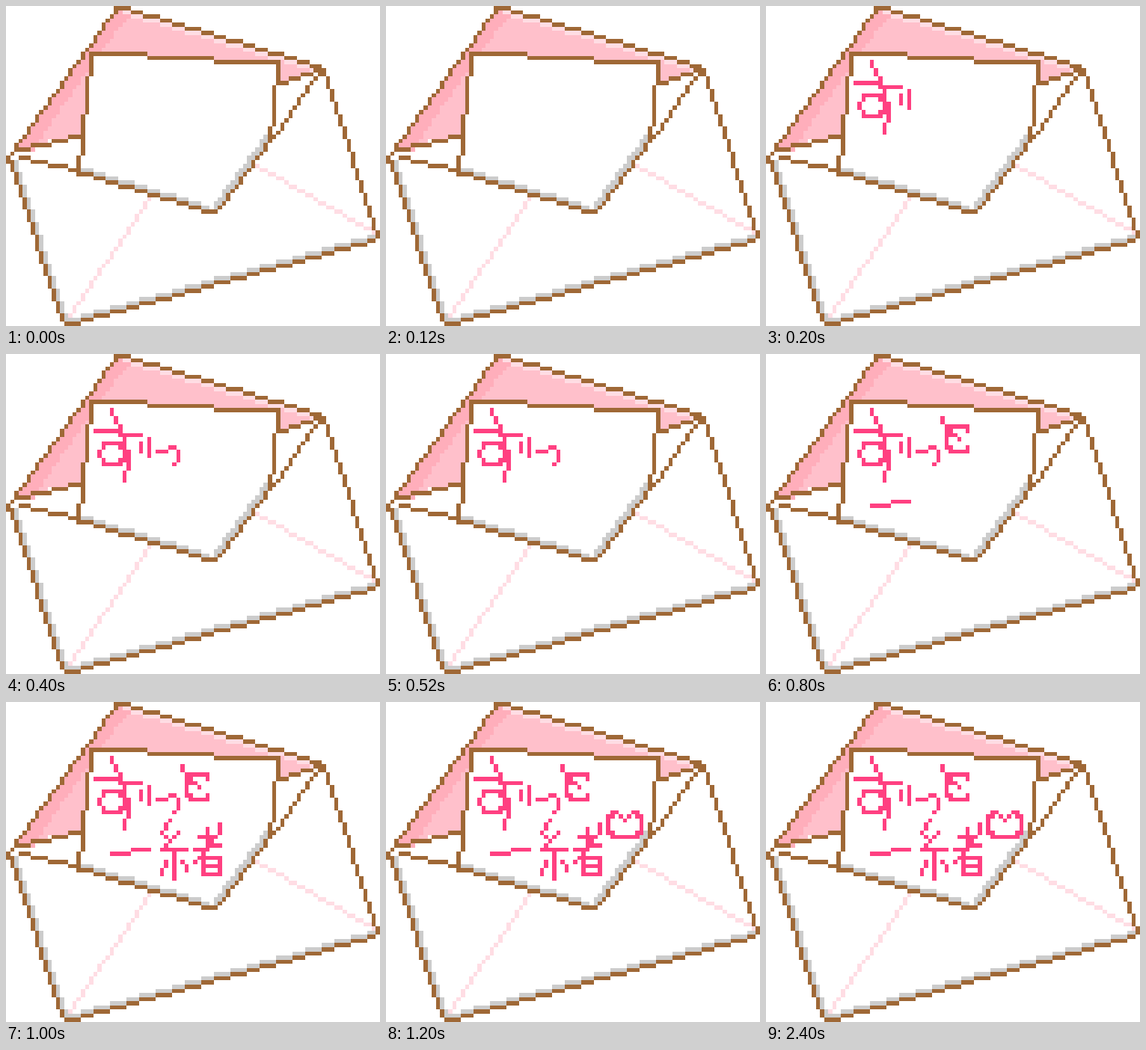
An HTML page with a canvas that plays this animation: 500x428 px, repeating every 3200 ms.

```html
<!DOCTYPE html>
<html lang="ja">
<head>
<meta charset="utf-8">
<title>Love letter</title>
<style>
  html, body { margin: 0; width: 100%; height: 100%; overflow: hidden; background: #fff; }
  canvas { display: block; width: 100%; height: 100%; image-rendering: pixelated; }
</style>
</head>
<body>
<canvas id="stage" width="90" height="77"></canvas>
<script>
const canvas = document.getElementById('stage');
const ctx = canvas.getContext('2d');
const WHITE = '#fff', BROWN = '#9f6836', GREY = '#ccc', INK = '#ff4081';
const PINK = '#ffc0cb', DEEP = '#ffaebb', PALE = '#ffdde4';
const LOOP = 3200, STEP = 200;

// Set every cell that fn(0..1) passes through
function plot(color, steps, fn) {
  ctx.fillStyle = color;
  for (let i = 0; i <= steps; i++) {
    const [x, y] = fn(i / steps);
    ctx.fillRect(Math.round(x), Math.round(y), 1, 1);
  }
}

function stroke(color, pts, dx = 0, dy = 0) {
  for (let i = 1; i < pts.length; i++) {
    const [x, y] = pts[i - 1], w = pts[i][0] - x, h = pts[i][1] - y;
    const steps = Math.round(Math.max(Math.abs(w), Math.abs(h)));
    plot(color, steps, t => [x + w * t + dx, y + h * t + dy]);
  }
}

// Elliptical arc, angles in degrees
function arc(color, cx, cy, rx, ry, from = 0, to = 360) {
  plot(color, 60, t => {
    const a = (from + (to - from) * t) * Math.PI / 180;
    return [cx + rx * Math.cos(a), cy + ry * Math.sin(a)];
  });
}

// Hard-edged polygon on the same grid as the lines
function fill(color, pts) {
  const shape = new Path2D('M' + pts.join('L') + 'Z');
  ctx.fillStyle = color;
  for (let y = 0; y < canvas.height; y++)
    for (let x = 0; x < canvas.width; x++)
      if (ctx.isPointInPath(shape, x, y)) ctx.fillRect(x, y, 1, 1);
}

// Corners of the envelope and the letter
const apex = [26.4, 0], west = [2.4, 33], east = [75.2, 15];
const south = [14, 76.4], southEast = [88, 56], tip = [50, 49];
const letter = {
  nw: [20.08, 11], ne: [65.08, 13], se: [63.1, 32], sw: [17.13, 39]
};
const edge = {
  left: [[.7, 37], [13, 75]],
  bottom: [south, southEast],
  right: [[76, 15], [89, 55]],
  mouthLeft: [[17, 39.5], [48, 48.9]],
  mouthRight: [[51, 48], letter.se],
  mouthTop: [[64.2, 31], east],
  pocket: [[3, 36], letter.sw],
  corner: [west, [1, 35], [0, 36], [0, 37]],
  tip: [[48, 49], tip],
  flapLeft: [apex, west],
  flapTop: [apex, [28, 0], [75, 14.2]],
  flapInLeft: [[3, 34], [17, 31]],
  flapInRight: [[66, 18], [75, 15]],
  letterTop: [[20, 10.67], [65, 13.49]],
  letterLeft: [letter.nw, letter.sw],
  letterRight: [letter.ne, letter.se]
};

function drawEnvelope() {
  ctx.fillStyle = WHITE;
  ctx.fillRect(0, 0, canvas.width, canvas.height);
  fill(PINK, [apex, ...edge.flapTop.slice(1), ...edge.flapInRight, ...edge.flapInLeft, west]);
  fill(DEEP, [apex, [29, 2], [22, 11], [6, 34], west]);
  stroke(PALE, edge.flapTop.slice(1), 0, 1);
  fill(WHITE, [...edge.letterTop, letter.se, tip, letter.sw]);

  stroke(PALE, [[34, 46], [15, 74]]);
  stroke(PALE, [[60, 38], [88, 54]]);
  stroke(GREY, edge.left, 1, 0);
  stroke(GREY, edge.bottom, 0, -1);
  stroke(GREY, edge.mouthLeft, 0, -1);
  stroke(GREY, edge.mouthRight, -1, 0);
  stroke(GREY, edge.mouthRight, -1, -1);

  Object.values(edge).forEach(e => stroke(BROWN, e));
}

const ink = (...pts) => stroke(INK, pts);

// One function per written character
const writing = [
  () => {
    ink([25, 13], [28, 20], [29, 25], [28, 30]);
    ink([21, 18], [32, 19]);
    arc(INK, 25.2, 23.5, 2.9, 2.6);
    ink([32, 21], [32, 23]);
    ink([34, 20], [34, 24]);
  },
  () => ink([36, 23], [40, 22], [41, 24], [40, 26]),
  () => {
    ink([42, 15], [43, 18], [46, 20]);
    arc(INK, 46, 20, 3.2, 3, 40, 315);
  },
  () => ink([25, 36], [34, 35]),
  () => {
    ink([39, 28], [37, 31], [39, 33]);
    ink([41, 31], [37, 35], [43, 35]);
    ink([40, 36], [40, 42]);
    ink([38, 38], [37, 41]);
    ink([42, 38], [43, 40]);
    ink([48, 30], [48, 34]);
    ink([46, 32], [50, 32]);
    ink([45, 35], [51, 34]);
    ink([51, 29], [51, 31], [45, 38]);
    arc(INK, 49, 39, 2.4, 2.4);
    ink([47, 39], [51, 39]);
  },
  () => {
    arc(INK, 57, 29, 4.2, 3.3, -55, 235);
    ink([55, 26], [57, 28], [59, 26]);
  }
];

let shown = -1;
function frame() {
  const step = Math.min(Math.floor(performance.now() % LOOP / STEP), writing.length);
  if (step !== shown) {
    drawEnvelope();
    writing.slice(0, step).forEach(write => write());
    shown = step;
  }
  requestAnimationFrame(frame);
}
frame();
</script>
</body>
</html>
```
